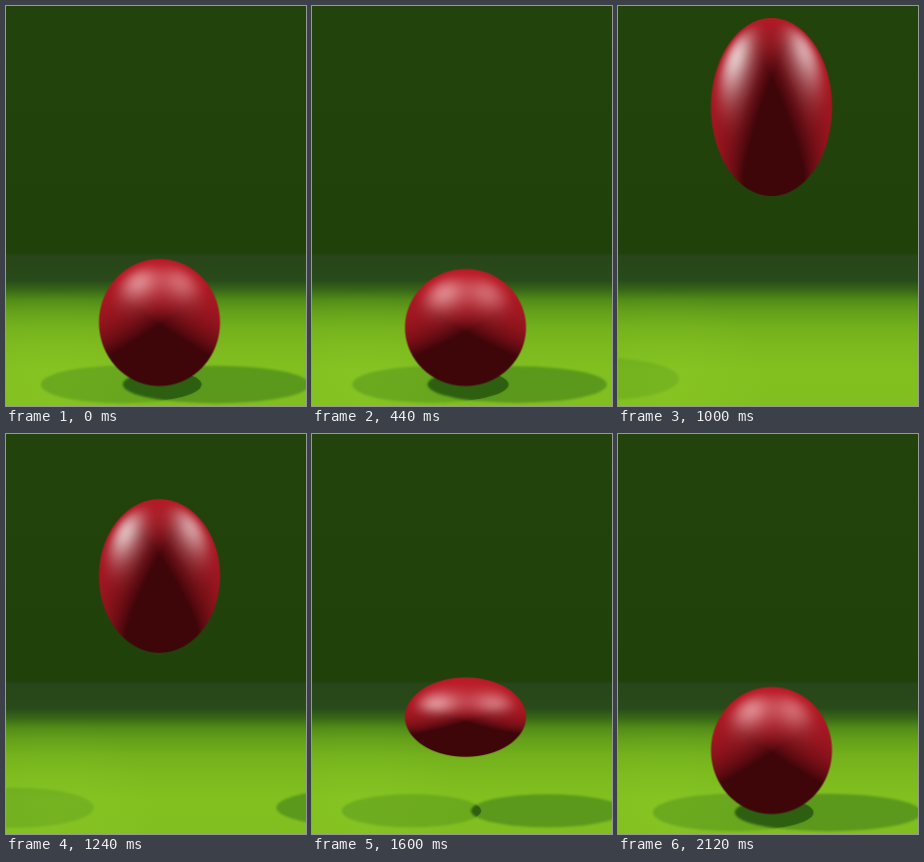
These frames come from a looping animation (300 px wide and 400 px high, 2.4 s). An HTML page with a canvas:

```html
<!DOCTYPE html>
<html>
<head>
<meta charset="utf-8">
<title>Bouncing ball</title>
<style>
  html, body { margin: 0; width: 100%; height: 100%; overflow: hidden; background: #22420c; }
  canvas { display: block; width: 300px; height: 400px; }
</style>
</head>
<body>
<canvas id="stage" width="300" height="400"></canvas>
<script>
const LOOP = 2400, STEP = 40, FLOOR = 380, MID = 153.5, RX = 60.5;
const ctx = document.getElementById('stage').getContext('2d');
const ball = document.createElement('canvas');
ball.width = 126;
ball.height = 190;
const ballCtx = ball.getContext('2d');

const clamp = (v, lo = 0, hi = 1) => Math.min(hi, Math.max(lo, v));
const smooth = u => u * u * (3 - 2 * u);

// Eased value at time t through [time, value] keys
function track(keys, t) {
  let i = 0;
  while (i < keys.length - 2 && t > keys[i + 1][0]) i++;
  const [t0, a] = keys[i], [t1, b] = keys[i + 1];
  return a + (b - a) * smooth(clamp((t - t0) / (t1 - t0)));
}

const heightKeys = [[0, 127], [240, 55], [640, 179], [1000, 178], [1840, 55], [2120, 127]];

function lift(t) {
  if (t < 1000) return 190 * smooth(clamp((t - 526) / 474));
  const u = clamp((t - 1000) / 800);
  return 190 * (1 - u * u * (1.97 - 0.97 * u)); // slow at the top, fast at landing
}

const ground = ctx.createLinearGradient(0, 0, 0, 400);
[[0, '#23430c'], [247, '#21410b'], [250, '#284619'], [274, '#294a19'], [284, '#386716'],
 [294, '#528c18'], [305, '#639f1a'], [320, '#72af1c'], [340, '#7cb91e'], [365, '#82c020'], [400, '#81be1f']]
  .forEach(([y, color]) => ground.addColorStop(y / 400, color));

const glare = ctx.createRadialGradient(50, 385, 0, 50, 385, 100);
glare.addColorStop(0, 'rgba(150,215,50,.2)');
glare.addColorStop(1, 'rgba(150,215,50,0)');

// Shadow between signed distances inner and outer from the middle
function shadow(side, inner, outer, y, ry) {
  const path = new Path2D();
  path.ellipse(MID + side * (inner + outer) / 2, y, (outer - inner) / 2, ry, 0, 0, 7);
  return path;
}

function drawShadows(up, h) {
  const top = up + h, y = 378.5 - 0.03 * up, ry = 13 + 0.045 * h;
  const left = shadow(-1, -56 + 0.11 * h + 0.5 * up + 0.00094 * up * up, 50 + 0.54 * top, y, ry);
  const right = shadow(1, -53 + 0.13 * h + 0.8 * up + 0.0008 * up * up, 42 + 0.85 * top, y, ry);
  ctx.save();
  ctx.filter = 'blur(1.2px)';
  ctx.fillStyle = `rgba(40,100,24,${0.27 - 0.0006 * up})`;
  ctx.fill(left);
  ctx.fillStyle = 'rgba(40,100,24,.42)';
  ctx.fill(right);
  ctx.clip(left);
  ctx.fillStyle = 'rgba(28,66,10,.6)';
  ctx.fill(right);
  ctx.restore();
}

const dot = (a, b) => a[0] * b[0] + a[1] * b[1] + a[2] * b[2];
const unit = v => v.map(c => c / (Math.hypot(...v) || 1));

function makeLight(x, view, gloss) {
  const dir = unit([x, 1, -0.15]);
  return { dir, half: unit(dir.map((c, i) => c + view[i])), gloss };
}

// Upright ellipsoid seen from above when low on the stage, from below when high
function drawBall(cy, ry) {
  const { width: w, height: h } = ball;
  const image = ballCtx.createImageData(w, h);
  const pitch = Math.atan((cy - 200) / 580), sin = Math.sin(pitch), cos = Math.cos(pitch);
  const view = [0, sin, cos], rise = 316 - cy;
  const lights = [
    makeLight(-0.6 - 0.0033 * rise, view, 105 + 0.3 * rise),
    makeLight(0.6 + 0.0022 * rise, view, 75 + 0.3 * rise)
  ];
  const a2 = RX * RX, b2 = (ry * ry - a2 * sin * sin) / (cos * cos);
  const A = sin * sin / b2 + cos * cos / a2;
  for (let j = 0; j < h; j++) for (let i = 0; i < w; i++) {
    const x = i + 0.5 - w / 2, s = h / 2 - j - 0.5;
    const r = Math.hypot(x / RX, s / ry);
    const cover = clamp(0.5 + (1 - r) * r / Math.hypot(x / a2, s / (ry * ry)));
    if (r > 0.2 && !cover) continue;
    const B = s * sin * cos * (1 / b2 - 1 / a2);
    const C = x * x / a2 + s * s * (cos * cos / b2 + sin * sin / a2) - 1;
    const depth = (Math.sqrt(Math.max(0, B * B - A * C)) - B) / A;
    const normal = unit([x / a2, (s * cos + depth * sin) / b2, (depth * cos - s * sin) / a2]);
    let lit = 0, shine = 0;
    for (const { dir, half, gloss } of lights) {
      const d = Math.max(0, dot(normal, dir));
      lit += d;
      shine += gloss * Math.min(1, d * 4) * Math.max(0, dot(normal, half)) ** 17;
    }
    const glow = 1 - Math.exp(-2.2 * lit);
    image.data.set([
      63 + 126 * glow + shine * 0.4,
      6 + 21 * glow + shine,
      10 + 29 * glow + shine * 0.95,
      255 * (r > 0.2 ? cover : 1)
    ], (j * w + i) * 4);
  }
  ballCtx.putImageData(image, 0, 0);
  ctx.drawImage(ball, MID - w / 2, cy - h / 2);
}

function draw(t) {
  const h = track(heightKeys, t), up = lift(t);
  ctx.fillStyle = ground;
  ctx.fillRect(0, 0, 300, 400);
  ctx.fillStyle = glare;
  ctx.fillRect(0, 0, 300, 400);
  drawShadows(up, h);
  drawBall(FLOOR - up - h / 2, h / 2);
}

const start = performance.now();
function tick() {
  const t = (performance.now() - start) % LOOP;
  draw(Math.floor(t / STEP) * STEP);
  requestAnimationFrame(tick);
}
tick();
</script>
</body>
</html>
```
